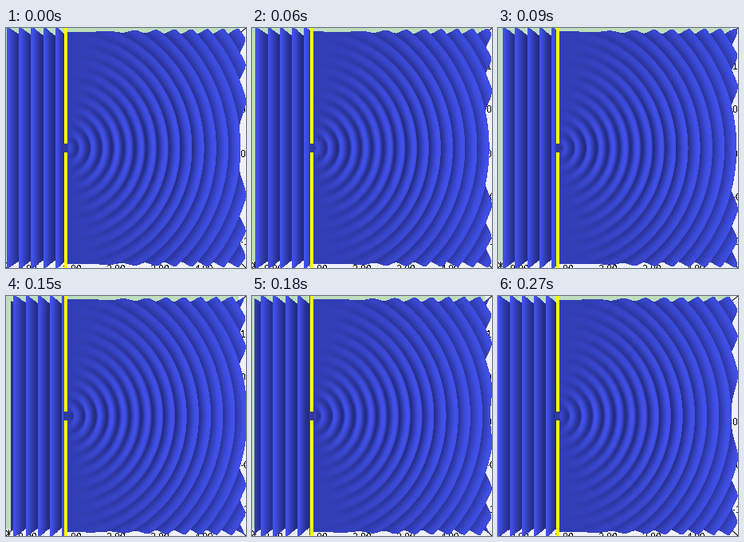
These frames come from a looping animation (301 by 301 pixels, 0.3 s). A matplotlib script:

```python
import numpy as np
import matplotlib.pyplot as plt
from matplotlib.animation import FuncAnimation

SIZE = 301
CENTER = 150.5        # camera looks straight down at this point
HALF = 145.5          # half the side of the water surface
DEPTH = 0.035         # perspective growth at a wave crest
WAVE = 14.8           # wavelength
CREST = 21.9          # x of a crest at the start of the loop
SLIT_X, SLIT_Y = 75, 150.5
PHASES = 9
ORDER = [0, 1, 2, 3, 4, 5, 6, 7, 7, 8]

BLUE = np.array([68, 84, 245])
GREEN = "#bedebe"
FLOOR = "#f1f1fd"

axis = np.arange(-HALF, HALF, 0.25) + CENTER
X, Y = np.meshgrid(axis, axis)
DX, DY = X - SLIT_X, Y - SLIT_Y
R = np.hypot(DX, DY) + 1e-6
BEHIND = DX < 0
PATH = np.where(BEHIND, X, SLIT_X + R)
SPREAD = np.clip(DX / R, 0, 1) ** 1.7 * np.minimum(1, 0.55 + R / 70)
AMP = np.where(BEHIND, 1, SPREAD)


def surface(phase):
    """Wave surface seen from above, as an RGBA image."""
    h = AMP * np.cos(2 * np.pi * ((PATH - CREST) / WAVE - phase / PHASES))
    slope = np.gradient(h, axis, axis=1) * WAVE / (2 * np.pi)
    light = 0.74 + 0.22 * h + 0.06 * np.clip(slope, -1, 1)

    zoom = 1 + DEPTH * h
    px = np.floor(CENTER + (X - CENTER) * zoom).astype(int).ravel()
    py = np.floor(CENTER + (Y - CENTER) * zoom).astype(int).ravel()
    inside = (px >= 0) & (px < SIZE) & (py >= 0) & (py < SIZE)

    # paint from low to high so that crests hide troughs
    order = np.argsort(h.ravel())
    order = order[inside[order]]
    shade = np.zeros((SIZE, SIZE))
    shade[py[order], px[order]] = light.ravel()[order]

    img = np.zeros((SIZE, SIZE, 4), np.uint8)
    img[..., :3] = np.clip(shade[..., None] * BLUE, 0, 255)
    img[..., 3] = np.where(shade > 0, 255, 0)
    return img


frames = [surface(p) for p in range(PHASES)]

fig = plt.figure(figsize=(SIZE / 100, SIZE / 100), dpi=100, facecolor=FLOOR)
ax = fig.add_axes([0, 0, 1, 1])
ax.axis("off")


def box(x, y, w, h, color, z):
    ax.add_patch(plt.Rectangle((x, y), w, h, fc=color, lw=0,
                               aa=False, zorder=z))


def line(x0, y0, x1, y1):
    ax.plot([x0, x1], [y0, y1], color="black", lw=0.72, zorder=2)


def label(x, y, text, ha, va):
    ax.text(x, y, text, family="Liberation Sans", size=8.64, ha=ha, va=va,
            antialiased=False, clip_on=True, zorder=2)


# walls and axes below the water
box(0, 0, 292, 9, GREEN, 1)
box(0, 0, 9, 292, GREEN, 1)
line(301, 0, 290, 9)
line(290, 290, 301, 301)
line(0, 301, 9, 292)
line(0, 294, 5, 299)
line(2.5, 293, 2.5, 300)

for i in range(5):
    label(27.5 + 55.2 * i, 297.5, f"{i}.00", "center", "top")
for i, text in enumerate(["1.00", "0.50", "0.00", "-0.50", "-1.00"]):
    label(294.5, 48.5 + 55 * i, text, "left", "center")

water = ax.imshow(frames[0], extent=(0, SIZE, SIZE, 0),
                  interpolation="nearest", zorder=3)

# barrier with its slit
box(73, 0, 4, 145, "#ffff00", 4)
box(73, 156, 4, 145, "#ffff00", 4)
box(72, 145, 6, 11, "#2f3b9c", 4)

ax.set_xlim(0, SIZE)
ax.set_ylim(SIZE, 0)
ax.set_aspect("auto")


def update(i):
    water.set_data(frames[ORDER[i]])
    return [water]


anim = FuncAnimation(fig, update, frames=len(ORDER), interval=30,
                     repeat=True, repeat_delay=0)
plt.show()
```
